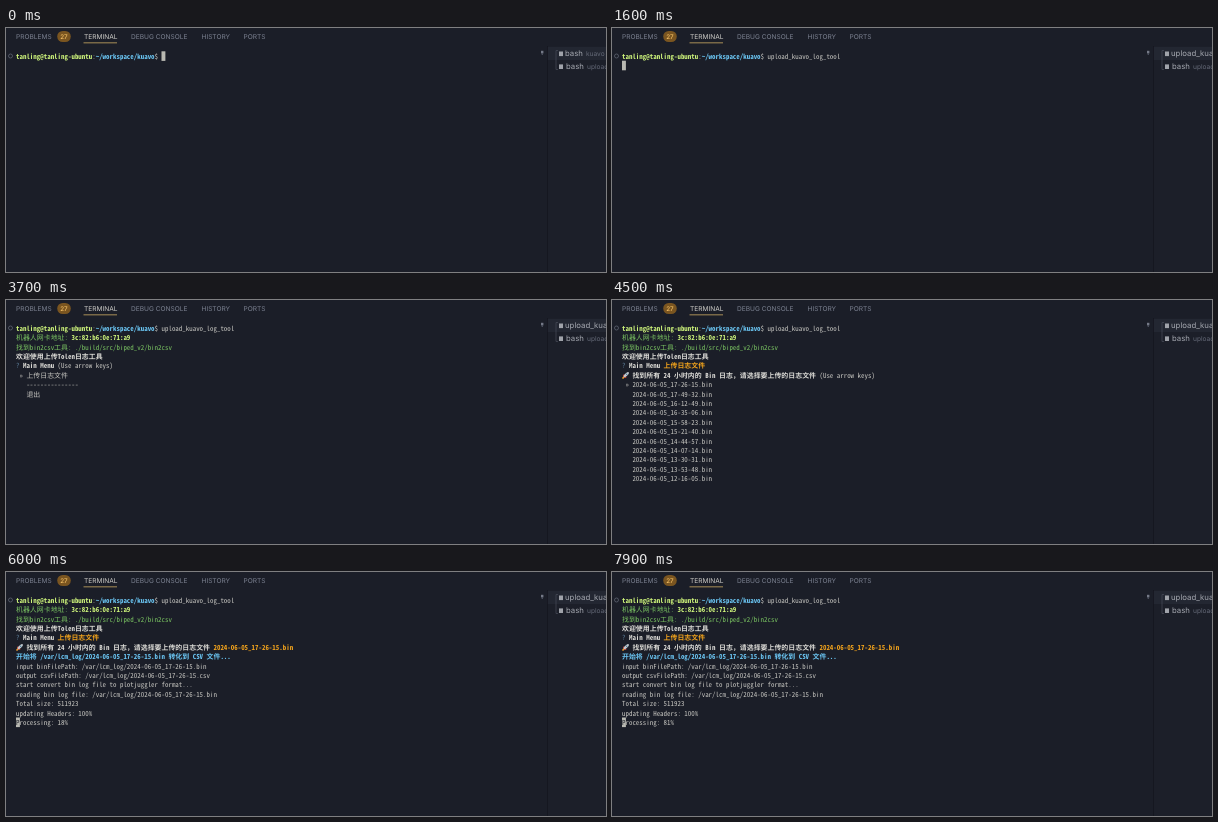
An HTML page with a canvas that plays this animation: 600x244 px, repeating every 8 s.

```html
<!DOCTYPE html>
<html lang="zh">
<head>
<meta charset="utf-8">
<title>Terminal session</title>
<style>
html, body { margin: 0; width: 100%; height: 100%; overflow: hidden; background: #1b1e28; }
canvas { display: block; width: 600px; height: 244px; }
</style>
</head>
<body>
<canvas id="stage"></canvas>
<script>
const W = 600, H = 244, LOOP = 8000;
const CELL = 3.464, ROW = 9.4, LEFT = 10, TOP = 28.2;
const MONO = '"Noto Sans Mono CJK SC", "Noto Sans CJK SC", "Noto Sans CJK", "Noto Sans Mono", monospace';
const UI = 'Inter, Roboto, sans-serif';
const BG = '#1b1e28', CURSOR = '#b9b9b2';

// Terminal text styles: [colour, weight]
const STYLE = {
  text: ['#c9c8c3', 400],
  bold: ['#deddd8', 700],
  user: ['#d0f77c', 700],
  path: ['#6cc8f6', 700],
  green: ['#7cc763', 400],
  mark: ['#5f819d', 400],
  pick: ['#f5a51c', 700]
};

const USER = 'tanling';
const BIN = '2024-06-05_17-26-15.bin';
const LOG = '/var/lcm_log/';
const COMMAND = 'upload_kuavo_log_tool';

const canvas = document.getElementById('stage');
const ctx = canvas.getContext('2d');
const dpr = window.devicePixelRatio || 1;
canvas.width = W * dpr;
canvas.height = H * dpr;

const rowY = row => TOP + row * ROW;
const cells = ch => ch.codePointAt(0) > 0x2e7f ? 2 : 1;

function rect(x, y, w, h, color) {
  ctx.fillStyle = color;
  ctx.fillRect(x, y, w, h);
}

function label(str, x, y, size, color, weight = 400) {
  ctx.font = `${weight} ${size}px ${UI}`;
  ctx.fillStyle = color;
  ctx.fillText(str, x, y + size * 0.364);
}

// Writes styled runs on the terminal grid and returns the next free column.
function write(row, runs, col = 0) {
  for (const [name, str] of runs) {
    const [color, weight] = STYLE[name];
    ctx.font = `${weight} ${CELL * 2}px ${MONO}`;
    ctx.fillStyle = color;
    for (const ch of str) {
      if (ch !== ' ') ctx.fillText(ch, LEFT + col * CELL, rowY(row) + 2.5);
      col += cells(ch);
    }
  }
  return col;
}

function cursor(row, col, under) {
  rect(LEFT + col * CELL, rowY(row) - 4.9, 3.9, 9.6, CURSOR);
  if (!under) return;
  ctx.font = `400 ${CELL * 2}px ${MONO}`;
  ctx.fillStyle = BG;
  ctx.fillText(under, LEFT + col * CELL, rowY(row) + 2.5);
}

function ellipse(x, y, rx, ry, color) {
  ctx.fillStyle = color;
  ctx.beginPath();
  ctx.ellipse(x, y, rx, ry, 0, 0, Math.PI * 2);
  ctx.fill();
}

function rocket(row) {
  ctx.save();
  ctx.translate(13.7, rowY(row));
  ctx.rotate(Math.PI / 4);
  ellipse(0, 3.3, 0.9, 1.5, '#f0a030');
  ellipse(0, 1.4, 2.1, 1.1, '#c9473f');
  ellipse(0, -0.8, 1.4, 3.4, '#c3cad0');
  ellipse(0, -1.4, 0.7, 0.7, '#4a7c9c');
  ctx.restore();
}

function panel(running) {
  label('PROBLEMS', 10, 8.6, 6.6, '#7b8090');
  ctx.fillStyle = '#7a5520';
  ctx.beginPath();
  ctx.roundRect(51.2, 3, 13.6, 11, 5.5);
  ctx.fill();
  label('27', 54.2, 8.6, 6.3, '#f5c065', 500);
  label('TERMINAL', 78, 8.6, 6.6, '#d0cfca');
  rect(77.5, 14.4, 33.5, 0.9, '#b79a5b');
  label('DEBUG CONSOLE', 125, 8.6, 6.6, '#7b8090');
  label('HISTORY', 195.5, 8.6, 6.6, '#7b8090');
  label('PORTS', 237.5, 8.6, 6.6, '#7b8090');

  rect(541, 18, 59, 226, '#1c1f29');
  rect(541, 19, 59, 13, '#232732');
  rect(541, 18, 0.8, 226, '#14161e');
  rect(535, 22.8, 2.4, 2.6, '#747987');
  rect(535.7, 25.4, 1, 1.6, '#5c6170');

  ctx.strokeStyle = '#484d5a';
  ctx.lineWidth = 0.7;
  ctx.beginPath();
  ctx.moveTo(552, 22.5);
  ctx.lineTo(550, 22.5);
  ctx.lineTo(550, 41.5);
  ctx.lineTo(552, 41.5);
  ctx.stroke();

  rect(553, 23.5, 4, 4.6, '#a0a3aa');
  rect(553, 36.4, 4, 4.6, '#a0a3aa');
  if (running) {
    label(COMMAND, 559, 25.6, 7.8, '#a5a8b0');
  } else {
    label('bash', 559, 25.6, 7.8, '#a5a8b0');
    label('kuavo', 580, 25.9, 6.6, '#666b79');
  }
  label('bash', 560, 38.5, 7.8, '#a5a8b0');
  label('upload_kuavo', 581, 38.8, 6.6, '#666b79');
}

function typedLength(t) {
  if (t >= 1200) return COMMAND.length;
  return [100, 200, 500, 800, 900, 1000, 1100].filter(at => t >= at).length;
}

function prompt(t) {
  ctx.strokeStyle = '#5d6270';
  ctx.lineWidth = 0.8;
  ctx.beginPath();
  ctx.arc(4.5, 28, 2, 0, Math.PI * 2);
  ctx.stroke();

  const end = write(0, [
    ['user', `${USER}@${USER}-ubuntu`], ['text', ':'],
    ['path', '~/workspace/kuavo'], ['text', '$ ' + COMMAND.slice(0, typedLength(t))]
  ]);
  if (t < 1400) cursor(0, end);
  else if (t < 3500) cursor(1, 0);
}

function intro() {
  write(1, [['green', '机器人网卡地址: '], ['user', '3c:82:b6:0e:71:a9']]);
  write(2, [['green', '找到bin2csv工具: ./build/src/biped_v2/bin2csv']]);
  write(3, [['bold', '欢迎使用上传Tolen日志工具']]);
}

function mainMenu() {
  write(4, [['mark', '? '], ['bold', 'Main Menu '], ['text', '(Use arrow keys)']]);
  write(5, [['text', ' » 上传日志文件']]);
  write(6, [['text', '   ' + '-'.repeat(15)]]);
  write(7, [['text', '   退出']]);
}

function chosenMenu(answer) {
  write(4, [['mark', '? '], ['bold', 'Main Menu '], ['pick', '上传日志文件']]);
  rocket(5);
  write(5, [['bold', '找到所有 24 小时内的 Bin 日志，请选择要上传的日志文件 '], answer], 3);
}

function fileList() {
  const two = n => String(n).padStart(2, '0');
  for (let i = 0; i < 11; i++) {
    const name = `2024-06-05_${17 - (i >> 1)}-${two((26 + i * 23) % 60)}-${two((15 + i * 17) % 60)}.bin`;
    write(6 + i, [['text', (i ? '   ' : ' » ') + name]]);
  }
}

function conversion(t) {
  write(6, [['path', `开始将 ${LOG}${BIN} 转化到 CSV 文件...`]]);
  if (t < 5900) {
    cursor(7, 0);
    return;
  }
  const percent = Math.round(18 + 63 * (t - 6000) / 1900);
  [
    `input binFilePath: ${LOG}${BIN}`,
    `output csvFilePath: ${LOG}${BIN.replace('.bin', '.csv')}`,
    'start convert bin log file to plotjuggler format...',
    `reading bin log file: ${LOG}${BIN}`,
    'Total size: 511923',
    'updating Headers: 100%',
    `Processing: ${percent}%`
  ].forEach((line, i) => write(7 + i, [['text', line]]));
  cursor(13, 0, 'P');
}

function draw(t) {
  ctx.setTransform(dpr, 0, 0, dpr, 0, 0);
  ctx.textRendering = 'geometricPrecision';
  rect(0, 0, W, H, BG);
  panel(t >= 1500);
  prompt(t);
  if (t < 3500) return;
  intro();
  if (t < 4400) {
    mainMenu();
  } else if (t < 5000) {
    chosenMenu(['text', '(Use arrow keys)']);
    fileList();
  } else {
    chosenMenu(['pick', BIN]);
    conversion(t);
  }
}

const start = performance.now();
function tick() {
  const t = (performance.now() - start) % LOOP;
  draw(Math.floor(t / 100) * 100);
  requestAnimationFrame(tick);
}
tick();
</script>
</body>
</html>
```
